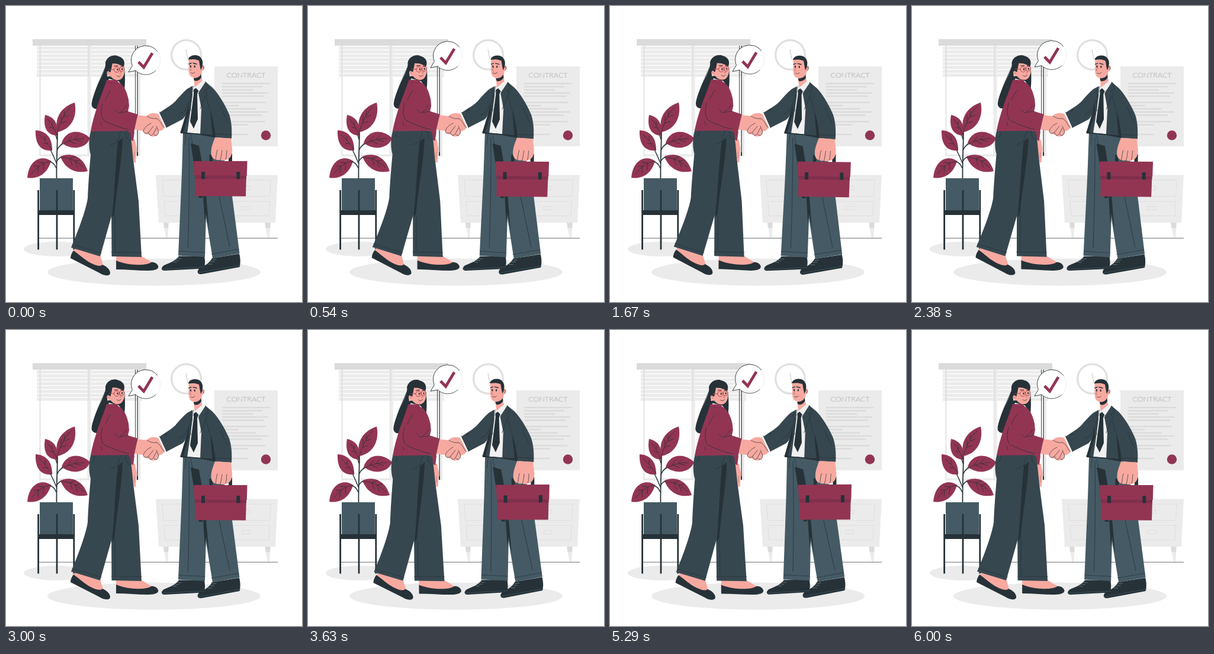
An HTML page with a canvas for the animation above (6040 ms loop, 500 by 500 pixels).

```html
<!DOCTYPE html>
<html lang="en">
<head>
<meta charset="utf-8">
<title>Handshake</title>
<style>
html, body { margin: 0; width: 100%; height: 100%; overflow: hidden; background: #fff; }
canvas { display: block; width: 500px; height: 500px; }
</style>
</head>
<body>
<canvas id="stage"></canvas>
<script>
const LOOP = 6040, SWAY = 0.0108, PIVOT = [250, 200], BOBS = 4, LIFT = 9;
const INK = '#263238', SLATE = '#37474f', STEEL = '#455a64', WINE = '#923553',
      WINE_DARK = '#802f4b', SKIN = '#f7a9a0', PALE = '#ebebeb', GREY = '#dbdbdb', WHITE = '#fff';

const canvas = document.getElementById('stage');
const ctx = canvas.getContext('2d');
const dpr = window.devicePixelRatio || 1;
canvas.width = canvas.height = 500 * dpr;

function fill(d, color) {
  ctx.fillStyle = color;
  ctx.fill(new Path2D(d));
}
function line(d, color = INK, width = 0.8) {
  ctx.strokeStyle = color;
  ctx.lineWidth = width;
  ctx.stroke(new Path2D(d));
}
function box(x1, y1, x2, y2, color) {
  ctx.fillStyle = color;
  ctx.fillRect(x1, y1, x2 - x1, y2 - y1);
}
function oval(x, y, rx, ry, color) {
  ctx.fillStyle = color;
  ctx.beginPath();
  ctx.ellipse(x, y, rx, ry, 0, 0, Math.PI * 2);
  ctx.fill();
}
function ring(x, y, r, color, width, from = 0, to = Math.PI * 2) {
  ctx.strokeStyle = color;
  ctx.lineWidth = width;
  ctx.beginPath();
  ctx.arc(x, y, r, from, to);
  ctx.stroke();
}

function drawWindow() {
  box(56, 67, 59, 254, PALE);
  box(137.5, 67, 143.5, 254, PALE);
  box(222, 67, 227, 254, PALE);
  box(56, 250.5, 227, 254, PALE);
  for (let i = 0; i < 8; i++) box(52, 68.5 + i * 6.55, 230, 73.6 + i * 6.55, PALE);
  box(56.5, 67, 58.5, 120, '#e2e2e2');
  box(138, 67, 141, 120, '#e2e2e2');
  box(45, 56, 237, 67, GREY);
  line('M218.5 67V185', INK, 0.9);
  line('M222 67V252', INK, 1.2);
  line('M222 247V253', INK, 2);
}

function drawClock() {
  oval(304.5, 82.5, 26.5, 26.5, '#e0e0e0');
  oval(304.5, 82.5, 23.2, 23.2, WHITE);
  line('M304 73L307 90', '#b5b5b5', 0.8);
}

function drawContract() {
  box(352, 102, 459, 237, PALE);
  ctx.fillStyle = '#a3a3a3';
  ctx.font = '300 12.5px Lato, "Open Sans", sans-serif';
  ctx.textAlign = 'center';
  ctx.fillText('CONTRACT', 405.5, 121);
  const rows = [[131, 446], [136.3, 433], [141.7, 417], [147, 443], [152.4, 436], [163, 439],
    [168.3, 393], [173.7, 422], [179, 443], [184.4, 432], [195.3, 438], [200.6, 409], [217, 409]];
  for (const [y, end] of rows) box(365, y - 1.2, end, y + 1.2, GREY);
  oval(439, 218.5, 8.2, 8.2, WINE);
}

function drawCabinet() {
  fill('M266 366H275L273 392H270.5ZM437 366H447L445 392H442Z', PALE);
  fill('M266 366H274.5L274 375H267ZM437.5 366H446.5L446 375H438.5Z', GREY);
  fill('M253 285.5H459L455 366H258Z', PALE);
  line('M264 294H447.5L445.5 321.5H266ZM267 330H445.5L444 354.5H269Z', GREY);
  line('M398 304.5H412V310.5H398ZM398 338.5H412V344.5H398Z', GREY);
}

function drawPlant() {
  line('M85.5 292C85 265 87 235 87 205', INK, 1.8);
  line('M85.5 266C82 258 79 250 74 241M86 244C89 237 94 231 104 228M86 262C89 256 94 253 103 255M85 274C82 266 77 261 66 263M86.5 226C84 217 80 209 76 203', INK, 1.5);
  const leaves = [
    'M87 213C82 196 87 173 116 163C120 181 115 207 87 213Z',
    'M86 219C70 218 62 206 66 184C83 188 89 200 86 219Z',
    'M78 244C60 246 49 235 50 210C68 211 78 222 78 244Z',
    'M94 231C100 212 122 205 142 223C136 241 111 245 94 231Z',
    'M92 254C108 247 130 252 138 279C118 284 99 275 92 254Z',
    'M76 262C64 252 39 256 36 290C53 293 70 284 76 262Z'
  ];
  for (const leaf of leaves) fill(leaf, WINE);
  line('M87 212C92 195 99 181 110 170M93 195L93 185M98 186L99 177M92 198L102 195M98 188L107 184');
  line('M86 218C82 207 77 199 70 191M81 207L74 204M78 201V195');
  line('M78 243C71 232 64 225 56 217M71 233L63 232M66 227V220');
  line('M90 238C101 228 116 224 133 224M104 229L111 220M114 226L122 218M107 228L118 233M117 226L128 229');
  line('M91 256C108 255 121 263 131 273M108 258L118 254M116 262L126 260M108 258L112 269M117 263L121 273');
  line('M77 262C62 263 51 274 43 284M64 265L54 264M56 270L47 271M64 266L63 277M55 271L54 282');
  box(57, 291, 113, 346, STEEL);
  box(55, 345, 114.5, 353, INK);
  for (const x of [54.6, 86, 114.8]) box(x - 1.4, 311, x + 1.4, 411.5, INK);
}

function drawBubble() {
  fill('M213.5 100L207 111.5L221 109Z', WHITE);
  oval(236, 91.5, 24.5, 24.5, WHITE);
  ring(236, 91.5, 24.5, INK, 0.9, 2.75, 5.65);
  line('M213.4 101L207 111.5L219 109.2', INK, 0.9);
  ring(236, 91.5, 24.5, '#e3e3e3', 0.6, -0.63, 0.8);
  ring(236, 91.5, 24.5, INK, 0.8, 0.8, 2.35);
  line('M223.8 94.5L232.7 103.5L247.2 79.5', WINE, 4.8);
}

function drawManLegs() {
  fill('M348 426L394 418.5C396.5 427 396 436 394.5 441L330 453C322.5 454 322 447 327 443C337 438 344 434 348 426Z', INK);
  fill('M292 422.5H335C337 432 336 440 334 443.5L268 447C261 447 262 441 267 438C278 433 286 431 292 422.5Z', INK);
  line('M264 444.5L335 441M325 450.5L395 438', STEEL, 0.7);
  line('M281 432L288 433M285 429L292 430M289 426L296 427M341 436L348 436M345 432L352 432M348 429L355 428', '#718087', 0.8);
  fill('M320 217L356 219L378 290L394.5 418L349 426L335 340Z', STEEL);
  fill('M299 213L342 217L338 350L336 424L291 421.5L295 330C297 290 298 250 299 213Z', STEEL);
  fill('M312 232L326 236L332 270V324H326Z', INK);
  fill('M333 320H338L343 377L338 350L336 367Z', INK);
  line('M309 222C310 280 309 345 307.5 408M360 322L378 406');
  line('M312 218L315 233L326 238M292 414L336 416.5M347 419L393 411M304 217L302 234', INK, 0.7);
}

function drawManBody() {
  // shirt and tie
  fill('M314 140L321 131L337 127L334 155L330 215L304 214L311 165Z', '#f0f0f0');
  fill('M317 123L330 118L332 129L319 138Z', SKIN);
  fill('M317 134L319 137L332 126L337 130L325 145L320 140L314 148L313 142Z', '#f0f0f0');
  line('M317 135L314 146L320 140L326 145L337 130', INK, 0.6);
  fill('M317 141L321 138.5L325 143L323 149L324 191L317 207L311 195L317 149Z', INK);

  // jacket and arms
  fill('M315 135L306 140C299 146 292 154 286 161C281 166 275 170 270 173L258 181L270 206L297 192C303 188 304 182 305 179L294.5 214L306 215.5L311 181L315 151Z', SLATE);
  fill('M337 128L349 138C357 146 369 164 377 183C381 195 382 209 381 224L353 222L328 217.5L330 173L325 147Z', SLATE);
  fill('M345 175C350 191 353 207 354 222L349 221.5Z', INK);
  fill('M305 179L309 163L309 181L299 214H294.5Z', INK);
  fill('M294.5 212L306 214L352 218V222L327 217.5L295 215Z', INK);
  line('M337 128L342 139L336 142L339 147L328 174M315 136L310 146L313 149L311 156L312 177', INK, 0.8);
  line('M353 216L381 217.5M345 175C340 164 341 159 338 153M310 160L302 177L291 184M267 178L273 175M363 171L374 195', INK, 0.7);
  oval(270.5, 176, 1.1, 1.1, INK);
  fill('M259 179L256.5 182L268 207L271 205Z', WHITE);
  line('M259 179L271 205', INK, 0.7);
}

function drawManHead() {
  fill('M308.5 89L327 88L331 100C336 98 337 107 331 110C331 117 328 121 321 121.5C312 122 308.5 117 308.5 108Z', SKIN);
  fill('M308 90.5C308 84 321 80 328 86C333 91 333 97 331 104L329 108L327.5 101L326 92C320 89.5 315 89.5 308 90.5Z', INK);
  fill('M317 121.5C322 122 327 120 329.5 115L330 120C328 125 323 127 319 126.5C317.5 125 317 123.5 317 121.5Z', INK);
  line('M309 98L313 96.5M316 96.5L322 98', INK, 1.4);
  oval(311.8, 101.8, 1.2, 1.9, INK);
  oval(318.7, 102.2, 1.2, 1.9, INK);
  line('M313 103L310.5 108L313 109', '#b65d5b', 0.8);
  line('M312 112.5C314 114.5 317 114 319 112M332 103L334 102M333 107L334.5 104', INK, 0.8);
}

function drawCase() {
  fill('M343.5 251H349V263H343.5ZM376 249H382V263H376Z', INK);
  fill('M319.5 285H406L405 321.5L319 321Z', WINE);
  fill('M319 286H406V292H319Z', WINE_DARK);
  fill('M317.2 262H407.5L406.8 287L318.2 286Z', WINE);
  for (const x of [330, 389.3]) box(x, 280, x + 6, 292.3, INK);
  fill('M353 222L380 223.5L382 241C383 252 378 259 371 260C368 262 364 261 362 260C355 261 347 259 346.5 249C346 239 350 231 353 222Z', SKIN);
  line('M354 260C355 255 355 249 357 243M362 260C364 254 364 249 365 244M371 259C373 254 372 248 373 244', INK, 0.7);
}

function drawWomanLegs() {
  // hanging far hand
  fill('M211 225L218 226C219 235 222 240 220 250L219 265L215.5 264L213 248Z', SKIN);
  line('M217 247L216.5 257', '#b65d5b', 0.6);
  fill('M207 208L217 212L215 228L210 226Z', WINE);

  fill('M116 409L159 421L165 441L144 439L114 420Z', SKIN);
  fill('M114 413C111 417 109 422 109 426L158 451C165 456 176 457 176 451C176 445 170 440 163 437C159 441 151 438 143 434C133 429 124 420 114 413Z', INK);
  fill('M186 422L228 422L248 434L234 441L186 437Z', SKIN);
  fill('M186 430V445C205 445 222 447 240 447C252 447 259 444 257 439C255 434 249 432 245 433C238 439 207 439 186 430Z', INK);

  fill('M169 210L209 211C212 226 213 240 215 260L224 330L229 424L178.5 423L178 345Z', SLATE);
  fill('M144 209L202 210C201 235 194 270 189 315L181 345L159 423L110 408C122 380 135 345 138 325C139 300 141 274 143 251C139 237 140 221 144 209Z', SLATE);
  fill('M189 229L197 223C196 259 188 301 183 352L179 358C183 322 184 276 189 229Z', INK);
  line('M112 403L161 417.5M178 416L229 416.5M184 355L184 414', INK, 0.7);
  line('M194 212L188 230L176 235M202 212C202 220 204 225 210 228M151 212L148 222', INK, 0.7);
}

function drawWomanBody() {
  fill('M170 125L187 125L190 129C199 133 204 144 207 158L208 169L206 178L222 183L216 212L209 214L206 211L143 212C145 199 149 186 153 173C157 160 164 144 170 125Z', WINE);
  line('M163 165C159 178 161 190 166 194C178 200 194 206 207 209', INK, 0.8);
  line('M206 178L190 181L184 175M203 168C201 174 197 177 193 179M160 196L162 203M177 143C173 148 170 153 168 159', INK, 0.7);
  line('M170 128C176 131 183 131 189 129', WINE_DARK, 0.8);
}

function drawWomanHead() {
  fill('M187 84C177 83 170 88 168 96C169 106 161 120 155 133C149 148 143 163 145 169C147 173 150 174 154 174L166 142L174 123L190 127C195 132 198 139 199 148C202 133 201 114 200 105Z', INK);
  line('M167 105C161 120 149 143 146 163', INK, 0.8);
  fill('M177 97L199 98C201 106 201 116 196 122C190 128 181 125 177 119C172 120 169 115 171 111C173 108 176 111 177 112Z', SKIN);
  fill('M168 96C170 86 181 81 190 85C198 87 202 94 199 102C194 100 186 97 180 95C179 101 178 108 176 112L171 109Z', INK);
  ring(187, 107.5, 4.5, '#a6404d', 0.9);
  ring(195.8, 106.5, 4, '#a6404d', 0.9);
  line('M191 106L192.2 105.7M174 107L182.6 107.3', '#a6404d', 0.9);
  line('M183 101.5L189 101M194 101L198 102', INK, 1.1);
  oval(188.4, 107.3, 1.1, 1.8, INK);
  oval(196.2, 106.6, 1.1, 1.8, INK);
  line('M192.5 109L194.5 113L192 113.5', '#b65d5b', 0.8);
  line('M187 117.5C189 120 192 119.5 194 117', INK, 0.8);
  line('M172 112L175 115', '#b65d5b', 0.8);
  oval(172.2, 118, 1.2, 1.2, WHITE);
}

function drawHands() {
  fill('M222 184.5L238 186C241 181 249 180 257 182L268 204L266 208C263 211 260 211 258 212C258 217 253 222 250 220C246 222 243 219 242 217C237 218 231 214 232 211L217 209Z', SKIN);
  line('M238 186C243 189 247 191 254 190M254 190C262 193 263 203 268 206M245 198C239 201 234 205 232 211C232 215 237 217 241 213L249 203', INK, 0.7);
  line('M241 214C242 221 248 219 250 214L254 206M250 217C255 222 259 215 257 210L254 203', INK, 0.7);
  line('M222 184L216 211', WINE_DARK, 0.9);
}

function render(now) {
  const phase = (now % LOOP) / LOOP * Math.PI * 2;
  ctx.setTransform(dpr, 0, 0, dpr, 0, 0);
  box(0, 0, 500, 500, WHITE);
  ctx.lineJoin = 'miter';
  ctx.lineCap = 'butt';
  drawWindow();
  drawClock();
  drawContract();
  drawCabinet();
  oval(86, 410.5, 56, 12.5, PALE);
  oval(250, 449.5, 180, 23, PALE);
  line('M55 392.2H459', INK, 0.7);
  drawPlant();

  ctx.save();
  ctx.translate(0, -LIFT * (1 - Math.cos(BOBS * phase)) / 2);
  drawBubble();
  ctx.restore();

  ctx.save();
  ctx.translate(...PIVOT);
  ctx.rotate(SWAY * Math.sin(phase));
  ctx.translate(-PIVOT[0], -PIVOT[1]);
  ctx.lineCap = 'round';
  drawManLegs();
  drawManBody();
  drawManHead();
  drawCase();
  drawWomanLegs();
  drawWomanHead();
  drawWomanBody();
  drawHands();
  ctx.restore();
}

const start = performance.now();
function tick() {
  render(performance.now() - start);
  requestAnimationFrame(tick);
}
tick();
</script>
</body>
</html>
```
